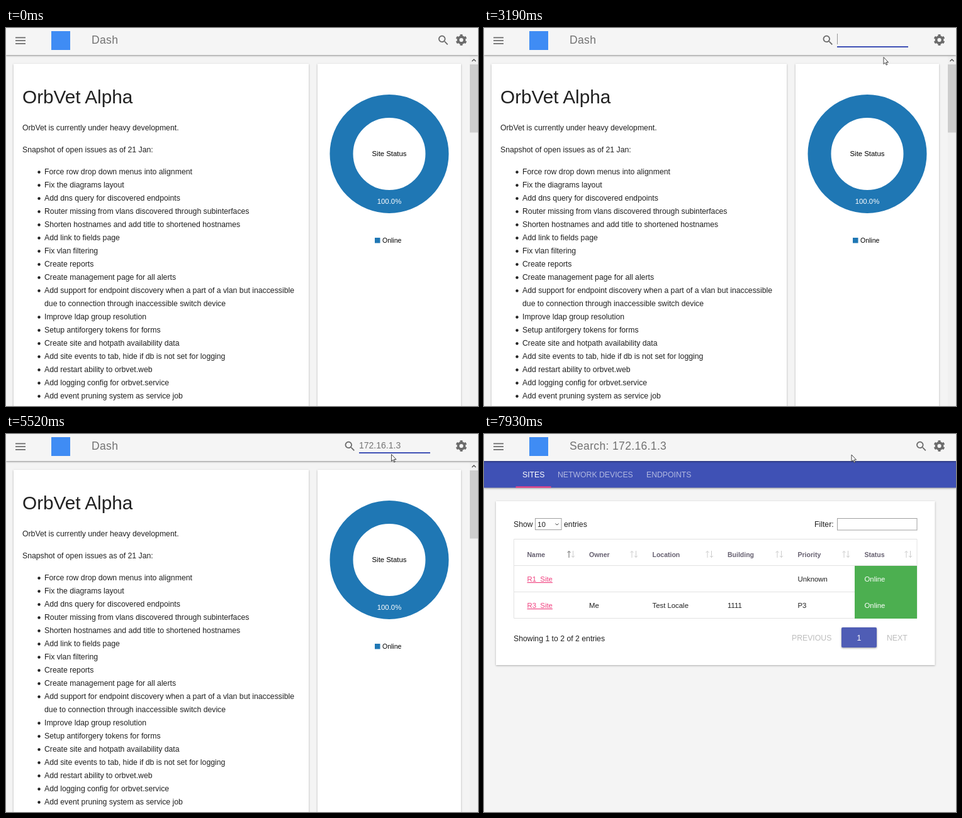
An HTML page that plays this animation: 750 px wide and 602 px high, repeating every 8000 ms.

```html
<!DOCTYPE html>
<html lang="en">
<head>
<meta charset="utf-8">
<title>Dashboard search</title>
<style>
  html, body { margin: 0; width: 100%; height: 100%; overflow: hidden; background: #f4f4f4; }
  svg { display: block; }
  text { font: 12.25px "Liberation Sans", Arial, sans-serif; fill: #212121; white-space: pre; }
  .card { fill: #fff; filter: drop-shadow(0 1.5px 1.5px rgba(0, 0, 0, .3)); }
  .box { fill: #fff; stroke: #a0a0a0; }
  .icon { fill: #6b6b6b; }
  #list text { font-family: "Open Sans", "Noto Sans", sans-serif; font-size: 9.6px; }
</style>
</head>
<body>
<svg width="750" height="602" viewBox="0 0 750 602">
  <rect width="750" height="602" fill="#f4f4f4"/>

  <g id="dash">
    <rect class="card" x="12" y="57" width="469" height="560"/>
    <rect class="card" x="495" y="57" width="228" height="560"/>
    <circle id="donut" cx="609" cy="200.5" fill="none" stroke="#1f77b4"/>
    <rect x="586" y="334" width="8.5" height="8.5" fill="#1f77b4"/>
    <rect x="737" y="44" width="13" height="558" fill="#f0f0f0"/>
    <rect x="737" y="58" width="13" height="108.500" fill="#cdcdcd"/>
    <path d="M740.500 53l3-3 3 3" fill="none" stroke="#505050" stroke-width="1.400"/>
    <g id="status">
      <rect x="-1" y="596.500" width="229.500" height="8" fill="#f7f7f7" stroke="#d5d5d5"/>
    </g>
  </g>

  <g id="results">
    <rect class="card" id="panel" x="19" y="107" width="697.500"/>
    <rect y="43" width="750" height="42.500" fill="#3f51b5" style="filter:drop-shadow(0 1.5px 1.5px rgba(0,0,0,.4))"/>
    <rect id="underline" x="50.500" width="56" fill="#ff4081"/>
    <g id="table">
      <rect class="box" x="81.500" y="134.500" width="41.500" height="18"/>
      <path d="M113.500 142.500l2.500 2.500 2.500-2.500" fill="none" stroke="#444"/>
      <rect class="box" x="561.500" y="134.500" width="126.500" height="18.500"/>
      <path d="M47.500 167.500H688V293.500H47.500zM47.500 209.500H688M47.500 251.500H688" fill="none" stroke="#e2e2e2"/>
      <rect x="589" y="210" width="99" height="84" fill="#4caf50"/>
      <rect x="568" y="308" width="56" height="32" rx="2" fill="#4f5db5" style="filter:drop-shadow(0 1.5px 1.5px rgba(0,0,0,.4))"/>
    </g>
  </g>

  <g id="header">
    <rect width="750" height="43" fill="#f5f5f5" style="filter:drop-shadow(0 1.5px 1.5px rgba(0,0,0,.45))"/>
    <path class="icon" d="M15 14.500h16v1.800H15zM15 19.200h16v1.800H15zM15 24h16v1.800H15z"/>
    <rect x="72" y="5" width="30" height="30" fill="#3f8cf4"/>
    <g fill="none" stroke="#6b6b6b">
      <circle cx="723.500" cy="19" r="5" stroke-width="3.800"/>
      <circle cx="723.500" cy="19" r="7.500" stroke-width="2.800" pathLength="12" stroke-dasharray="1 1" transform="rotate(-105 723.500 19)"/>
    </g>
    <path id="glass" class="icon" d="M15.500 14h-.79l-.28-.27C15.410 12.590 16 11.110 16 9.500 16 5.910 13.090 3 9.500 3S3 5.910 3 9.500 5.910 16 9.500 16c1.610 0 3.090-.59 4.230-1.570l.27.28v.79l5 4.990L20.490 19l-4.990-5zm-6 0C7.010 14 5 11.990 5 9.500S7.010 5 9.500 5 14 7.010 14 9.500 11.990 14 9.500 14z"/>
    <rect id="field" y="29" height="2" fill="#3f51b5"/>
    <rect id="caret" x="561" y="9" width="1" height="17" fill="#999"/>
  </g>

  <g id="list">
    <rect x="561.500" y="30" width="112.500" height="95" fill="#fff" stroke="#777" style="filter:drop-shadow(1.5px 1.5px .8px rgba(0,0,0,.45))"/>
    <rect id="mark" x="562" width="111.500" height="15.800" fill="#0078d7"/>
  </g>

  <path id="arrow" d="M.5 .5V11.500L3 9.200l1.700 3.800 1.600-.7-1.700-3.700H8z" fill="#fff" stroke="#333" stroke-width=".9"/>
  <path id="beam" d="M-2.500 .5H-.5L0 1l.5-.5h2M0 1v9M-2.500 10.500H-.5L0 10l.5.500h2" fill="none" stroke="#222"/>
</svg>

<script>
const LOOP = 8000;
const $ = id => document.getElementById(id);
const show = (id, on) => { $(id).style.display = on ? "" : "none"; };

function add(parent, tag, attrs, text = "") {
  const el = document.createElementNS("http://www.w3.org/2000/svg", tag);
  for (const key in attrs) el.setAttribute(key, attrs[key]);
  el.textContent = text;
  $(parent).append(el);
  return el;
}
const write = (parent, x, y, text, style = "") => add(parent, "text", { x, y, style }, text);

// Dashboard
write("dash", 26, 120, "OrbVet Alpha", "font-size:29.75px");
write("dash", 26, 163, "OrbVet is currently under heavy development.");
write("dash", 26, 198, "Snapshot of open issues as of 21 Jan:");
[
  "Force row drop down menus into alignment",
  "Fix the diagrams layout",
  "Add dns query for discovered endpoints",
  "Router missing from vlans discovered through subinterfaces",
  "Shorten hostnames and add title to shortened hostnames",
  "Add link to fields page",
  "Fix vlan filtering",
  "Create reports",
  "Create management page for all alerts",
  "Add support for endpoint discovery when a part of a vlan but inaccessible",
  " due to connection through inaccessible switch device",
  "Improve ldap group resolution",
  "Setup antiforgery tokens for forms",
  "Create site and hotpath availability data",
  "Add site events to tab, hide if db is not set for logging",
  "Add restart ability to orbvet.web",
  "Add logging config for orbvet.service",
  "Add event pruning system as service job",
].forEach((line, i) => {
  const y = 233 + 21 * i;
  write("dash", 61, y, line.trim());
  if (line[0] !== " ") add("dash", "circle", { cx: 52.5, cy: y - 3.5, r: 2.2, fill: "#212121" });
});
const chart = "font-size:11.375px;text-anchor:middle;fill:";
write("dash", 609, 204, "Site Status", chart + "#000");
write("dash", 609, 280, "100.0%", chart + "#fff");
write("dash", 598, 342, "Online", "font-size:10.5px;fill:#000");
$("dash").append($("status"));

// Search results
const faded = "fill:#b2b9e1";
write("results", 61, 68.5, "SITES", "fill:#fff");
write("results", 117, 68.5, "NETWORK DEVICES", faded);
write("results", 258, 68.5, "ENDPOINTS", faded);

write("table", 47, 148, "Show");
write("table", 85, 148, "10", "font-size:11.67px");
write("table", 127, 148, "entries");
write("table", 525, 148, "Filter:");
const columns = [68.5, 167, 267.5, 387, 498.5, 604.5];
const sorters = [132, 232, 352, 463, 569, 668];
["Name", "Owner", "Location", "Building", "Priority", "Status"].forEach((name, i) => {
  write("table", columns[i], 195.5, name, "font-size:10.5px;font-weight:bold;fill:#666070");
  const arrow = (x, d, stroke) => add("table", "path",
    { d, stroke, fill: "none", transform: `translate(${sorters[i] + x} 186)` });
  arrow(0, "M3 11V.5M.5 3L3 .5 5.500 3", i ? "#ccc" : "#666");
  arrow(6.5, "M3 0V10.500M.5 8L3 10.500 5.500 8", "#ccc");
});
[
  ["R1_Site", "", "", "", "Unknown", "Online"],
  ["R3_Site", "Me", "Test Locale", "1111", "P3", "Online"],
].forEach((row, r) => row.forEach((cell, c) => write("table", columns[c], 235 + 42 * r, cell,
  "font-size:11.375px;" + ({ 0: "fill:#f0407f;text-decoration:underline", 5: "fill:#fff" }[c] || ""))));
write("table", 47, 330, "Showing 1 to 2 of 2 entries");
write("table", 489, 328.5, "PREVIOUS", "fill:#bdbdbd");
write("table", 596, 328.5, "1", "fill:#fff;text-anchor:middle");
write("table", 640, 328.5, "NEXT", "fill:#bdbdbd");

// Header and suggestions
const title = write("header", 136, 25, "", "font-size:17.5px;letter-spacing:.35px;fill:#727272");
const query = write("header", 561, 22.5, "172.16.1.3", "font-size:14px;fill:#757575");
const options = ["r3", "172.16.1.3", "172.16.1.0/24", "test", "192.168.33.0", "search"]
  .map((text, i) => write("list", 571, 42.5 + 15.8 * i, text));

// Pointer path: time, x, y
const path = [
  [760, 745, 430], [1000, 670, 260], [1310, 575, 125], [1460, 575, 125], [1630, 442, 35],
  [2010, 125, 42], [2400, 400, 24], [2800, 698, 20], [2890, 698, 20], [3190, 634.5, 46],
  [3510, 606, 17], [4440, 606, 17], [4750, 604, 55.5], [5210, 604, 55.5], [5750, 617, 17],
  [6999, 617, 17], [7000, 615.5, 23], [7779, 615.5, 23], [7780, 603, 18], [7929, 603, 18],
  [7930, 583.5, 32.5], [LOOP, 583.5, 32.5],
];
const clamp = v => Math.max(0, Math.min(1, v));
const ease = v => v * v * (3 - 2 * v);

function pointer(t) {
  const i = Math.max(1, path.findIndex(p => p[0] > t));
  const [a, b] = [path[i - 1], path[i]];
  const k = ease(clamp((t - a[0]) / (b[0] - a[0])));
  return [a[1] + (b[1] - a[1]) * k, a[2] + (b[2] - a[2]) * k];
}

function render(t) {
  const results = t >= 7000, loaded = t >= 7080;
  show("dash", !results);
  show("results", results);
  show("table", loaded);
  show("status", t >= 6680);
  $("panel").setAttribute("height", loaded ? 261 : 28);
  $("underline").setAttribute("y", loaded ? 83.5 : 84.5);
  $("underline").setAttribute("height", loaded ? 2 : 1);
  title.textContent = results ? "Search: 172.16.1.3" : "Dash";

  const grow = clamp((t - 1050) / 50) - clamp((t - 1500) / 50);
  const outer = 94.5 * (1 + .03 * grow);
  $("donut").setAttribute("r", (outer + 57.5) / 2);
  $("donut").setAttribute("stroke-width", outer - 57.5);

  const open = results ? 0 : ease(clamp((t - 2890) / 200));
  $("glass").setAttribute("transform", `translate(${684.5 - 148.5 * open} 9) scale(.875)`);
  $("field").setAttribute("x", 709.5 - 148.5 * open);
  $("field").setAttribute("width", 113 * open);
  show("field", open > 0);
  show("caret", open === 1 && t < 5210);
  query.style.display = t >= 5210 && !results ? "" : "none";

  const [x, y] = pointer(t);
  const visible = t >= 760 && (t < 1630 || t >= 2010);
  const typing = open === 1 && x > 561 && x < 674 && y < 29;
  show("arrow", visible && !typing);
  show("beam", visible && typing);
  for (const id of ["arrow", "beam"]) $(id).setAttribute("transform", `translate(${x} ${y})`);

  show("list", t >= 3660 && t < 5210);
  const row = y > 30.5 ? Math.floor((y - 30.5) / 15.8) : -1;
  show("mark", row >= 0);
  $("mark").setAttribute("y", 30.5 + 15.8 * row);
  options.forEach((el, i) => { el.style.fill = i === row ? "#fff" : "#222"; });
}

const start = performance.now();
function tick() {
  render((performance.now() - start) % LOOP);
  requestAnimationFrame(tick);
}
tick();
</script>
</body>
</html>
```
